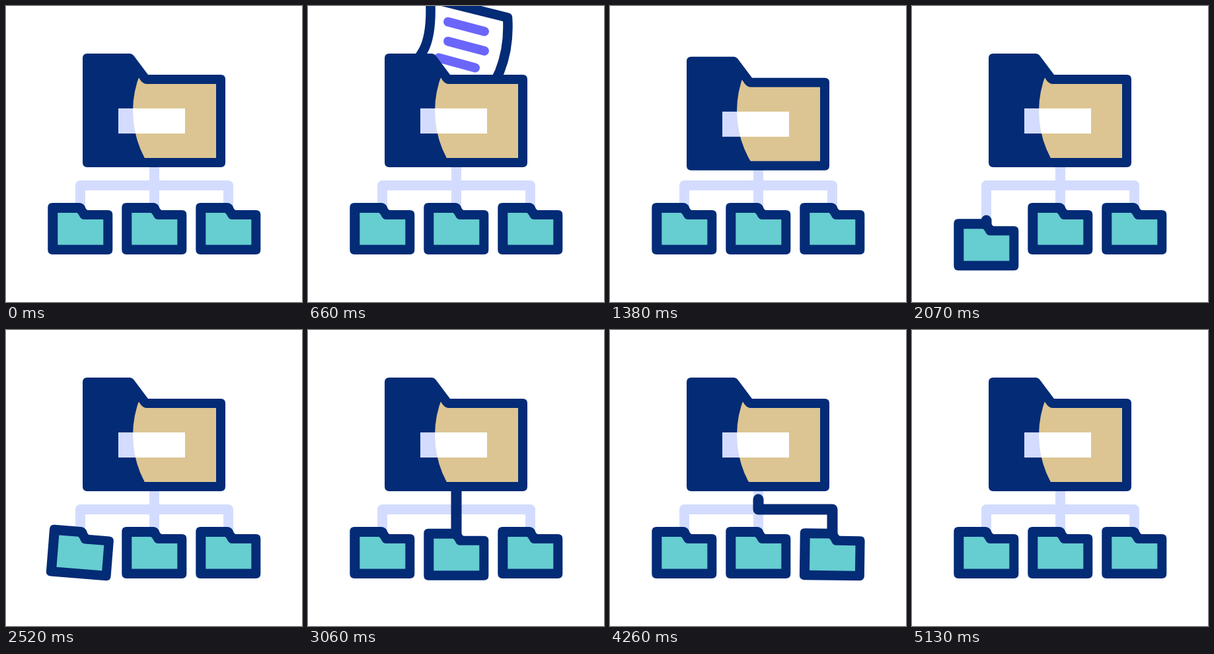
Write an HTML page that moves like this. It is 448 px wide and 448 px high and loops after 5400 ms.

```html
<!DOCTYPE html>
<html lang="en">
<head>
<meta charset="utf-8">
<title>Folder tree</title>
<style>
  html, body { margin: 0; width: 100%; height: 100%; overflow: hidden; background: #fff; }
  svg { display: block; width: 100vw; height: 100vh; }
  .navy { fill: #032b76; }
  .teal { fill: #66cdd0; }
  .tan { fill: #dcc592; }
  .line { fill: none; stroke-linecap: round; stroke-linejoin: round; }
  .wire { stroke: #d3dcfe; stroke-width: 15; }
  .pulse { stroke: #032b76; stroke-width: 16; visibility: hidden; }
  .edge { fill: #fff; stroke: #032b76; stroke-width: 14.5; stroke-linejoin: round; }
  .text { stroke: #6b66fa; stroke-width: 14; }
</style>
</head>
<body>
<svg viewBox="0 0 448 448">
  <defs>
    <clipPath id="lit"><circle cx="342" cy="159" r="150"/></clipPath>
    <g id="folder">
      <path class="navy" d="M-42-39H-2Q4-39 7-34Q9-28 12-28H42Q49-28 49-21V32Q49 39 42 39H-42Q-49 39-49 32V-32Q-49-39-42-39Z"/>
      <path class="teal" d="M-34-24H-5Q-3-23-1-19Q1-14 6-14H35V24.500H-34Z"/>
    </g>
  </defs>

  <path class="line wire" d="M224.500 234V330M112.500 330V271.500H336.500V330"/>
  <path class="line pulse" d="M224.500 234V271.500H112.500V330"/>
  <path class="line pulse" d="M224.500 234V330"/>
  <path class="line pulse" d="M224.500 234V271.500H336.500V330"/>

  <g id="paper">
    <path class="edge" d="M185-13L302 16Q305 60 290 98Q282 116 268 131L146 102Q166 82 175 65Q188 40 185-13Z"/>
    <path class="line text" d="M212 22.500L267 37M212 52L267 66.500M198 77L253 92"/>
  </g>

  <g class="big">
    <path class="navy" d="M123 72H187Q191 72 194 76L215 104H325Q332 104 332 111V237Q332 244 325 244H123Q116 244 116 237V79Q116 72 123 72Z"/>
    <rect x="170" y="155" width="101" height="38" fill="#d3dcfe"/>
  </g>
  <g clip-path="url(#lit)">
    <g class="big">
      <path class="tan" d="M180 80L200 107L204 113Q208 118 213 118H318V230H180Z"/>
      <rect x="170" y="155" width="101" height="38" fill="#fff"/>
    </g>
  </g>

  <use class="small" href="#folder"/>
  <use class="small" href="#folder"/>
  <use class="small" href="#folder"/>
</svg>
<script>
const LOOP = 5400;
const all = s => [...document.querySelectorAll(s)];
const paper = document.getElementById('paper');
const bigs = all('.big');

// Smooth interpolation through [time, value] steps
function at(steps, t) {
  if (t <= steps[0][0]) return steps[0][1];
  for (let i = 1; i < steps.length; i++) {
    const [t0, a] = steps[i - 1], [t1, b] = steps[i];
    if (t < t1) {
      const u = (t - t0) / (t1 - t0);
      return a + (b - a) * u * u * (3 - 2 * u);
    }
  }
  return steps[steps.length - 1][1];
}

const FALL = [[210, -165], [990, 105]];
const DIP = [[900, 0], [1200, 14], [1500, 0]];

// Times below are relative to the moment a pulse hits its folder
const HEAD = [[-270, 0], [30, 1]];
const TAIL = [[0, 0], [300, 1]];
const DROP = [[0, 0], [300, 25], [600, 0]];
const SWAY = [[270, 0], [480, -7], [690, 5], [900, -3], [1080, 1.5], [1230, 0]];
const SETTLE = [[270, 0], [480, -7], [690, 5], [870, -2.5], [1020, 0]];
const TILT = [[0, 0], [300, 7], [420, 8], [600, -5], [760, 3], [930, 0]];

const pulses = all('.pulse');
const branches = all('.small').map((folder, i) => ({
  folder,
  pulse: pulses[i],
  length: pulses[i].getTotalLength(),
  x: 112.3 + 112 * i,
  hit: 1800 + 1200 * i,
  turn: [SWAY, SETTLE, TILT][i]
}));

function drawBranch({ folder, pulse, length, x, hit, turn }, time) {
  const t = time - hit;
  const on = t > -270 && t < 300;
  pulse.style.visibility = on ? 'visible' : 'hidden';
  if (on) {
    const start = at(TAIL, t) * length;
    const end = at(HEAD, t) * length;
    pulse.style.strokeDasharray = `${Math.max(end - start, 0.01)} 999`;
    pulse.style.strokeDashoffset = -start;
  }
  folder.setAttribute('transform', `translate(${x} ${337 + at(DROP, t)}) rotate(${at(turn, t)})`);
}

function draw(t) {
  paper.style.visibility = t > 210 && t < 1170 ? 'visible' : 'hidden';
  paper.setAttribute('transform', `translate(0 ${at(FALL, t)})`);
  const dip = at(DIP, t);
  bigs.forEach(g => g.setAttribute('transform', `translate(0 ${dip})`));
  branches.forEach(b => drawBranch(b, t));
}

const begin = performance.now();
function tick() {
  draw((performance.now() - begin) % LOOP);
  requestAnimationFrame(tick);
}
tick();
</script>
</body>
</html>
```
